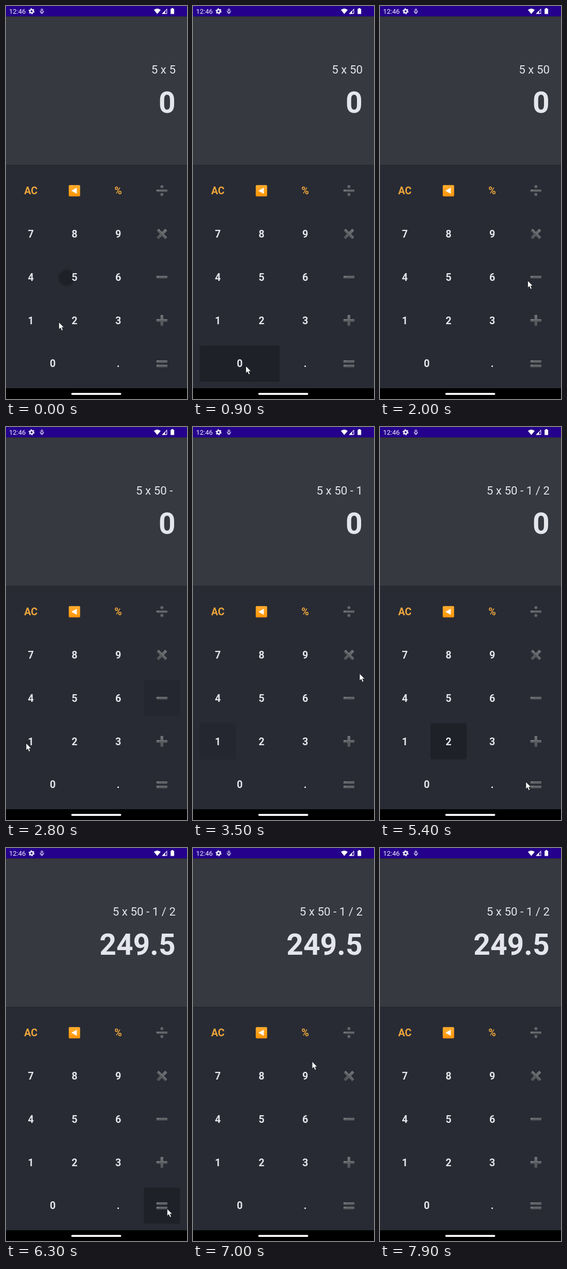
An HTML page that plays this animation: 351 px wide and 762 px high, repeating every 8 s.

```html
<!DOCTYPE html>
<html lang="en">
<head>
<meta charset="utf-8">
<title>Calculator</title>
<style>
  html, body { margin: 0; width: 100%; height: 100%; overflow: hidden; background: #000; }
  svg { display: block; width: 100%; height: 100%; }
  text { font-family: Roboto, Arial, sans-serif; fill: #e4e6eb; }
  .key { font-size: 19.7px; font-weight: 700; text-anchor: middle; }
  .accent { fill: #efa63c; }
  #expr { font-size: 22.3px; text-anchor: end; }
  #result { font-size: 57px; font-weight: 700; text-anchor: end; }
  #clock { font-size: 13px; fill: #f4f0ff; }
</style>
</head>
<body>
<svg viewBox="0 0 351 762">
  <defs>
    <linearGradient id="metal" x1="0" y1="0" x2="0" y2="1">
      <stop offset="0" stop-color="#74767a"/>
      <stop offset=".4" stop-color="#626468"/>
      <stop offset="1" stop-color="#505256"/>
    </linearGradient>
    <linearGradient id="amber" x1="0" y1="0" x2="0" y2="1">
      <stop offset="0" stop-color="#ffac30"/>
      <stop offset=".85" stop-color="#ff9a0c"/>
      <stop offset="1" stop-color="#e98a14"/>
    </linearGradient>
    <filter id="soft" x="-30%" y="-30%" width="160%" height="160%"><feGaussianBlur stdDeviation="1.8"/></filter>
  </defs>

  <rect width="351" height="20.2" fill="#25008c"/>
  <rect y="20.2" width="351" height="288.3" fill="#36393f"/>
  <rect y="308.5" width="351" height="433" fill="#282b34"/>
  <rect y="741.3" width="351" height="21" fill="#000"/>
  <rect x="126.5" y="750.3" width="97" height="3.6" rx="1.8" fill="#fff"/>

  <!-- status bar -->
  <text id="clock" x="6" y="14.6">12:46</text>
  <g fill="none" stroke="#f4f0ff">
    <circle cx="49.6" cy="10.2" r="3.2" stroke-width="2.5"/>
    <circle cx="49.6" cy="10.2" r="5" stroke-width="1.6" stroke-dasharray="2.6 2.636"/>
    <circle cx="69.6" cy="7.4" r="1.7" stroke-width="1.1"/>
    <path d="M66.2 9.2a3.4 3 0 0 0 6.8 0M67.2 12.6l2.4 2.2l2.4-2.2" stroke-width="1.1"/>
    <path d="M304 14.6H311.8V6.2Z" stroke-width="1.2"/>
  </g>
  <g fill="#fff">
    <path d="M286.8 7.4Q293.4 2.4 300 7.4L293.4 15.4Z"/>
    <path d="M302.2 15.2L308.6 8.8V15.2Z"/>
    <path d="M319.2 5.4H321.1V4.1H324.2V5.4H326.1V15.6H319.2Z"/>
  </g>

  <text id="expr" x="329" y="131"></text>
  <text id="result" x="328.6" y="206.7"></text>
  <g id="presses" fill="#000"></g>
  <g id="keys"></g>
  <path id="cursor" d="M0 0V14L3.2 11.1L5.4 16.4L8 15.3L5.8 10.2H10Z" fill="#fff" stroke="#15171c" stroke-width=".8"/>
</svg>
<script>
const LOOP = 8000, STEP = 100;
const $ = id => document.getElementById(id);
const clamp = v => Math.max(0, Math.min(1, v));
const mix = (a, b, p) => a + (b - a) * p;
const smooth = p => p * p * (3 - 2 * p);

function add(parent, tag, attrs, text = '') {
  const el = document.createElementNS('http://www.w3.org/2000/svg', tag);
  for (const k in attrs) el.setAttribute(k, attrs[k]);
  el.textContent = text;
  parent.append(el);
  return el;
}

// Keypad: each row lists its keys; the wide 0 fills two cells
const cells = {};
const symbols = {
  '/': g => {
    bar(g, 0, 4.4);
    for (const cy of [-7.6, 7.6]) add(g, 'circle', { cy, r: 3 });
  },
  'x': g => cross(g, 23.6, 45),
  '-': g => bar(g, 0, 5),
  '+': g => cross(g, 21.4, 0),
  '=': g => { bar(g, -4, 5); bar(g, 4.5, 5); },
  '<': g => {
    add(g, 'rect', { x: -11.2, y: -11, width: 22, height: 22, rx: 2, fill: 'url(#amber)' });
    add(g, 'path', { d: 'M-5.4 0L4 -5.2V5.2Z', fill: '#fff', stroke: '#fff', 'stroke-width': .8, 'stroke-linejoin': 'round' });
  }
};

function bar(g, y, h, w = 21.4) {
  add(g, 'rect', { x: -w / 2, y: y - h / 2, width: w, height: h, rx: .8 });
  add(g, 'rect', { x: 1 - w / 2, y: y - h / 2 + .8, width: 4, height: 1.2, rx: .6, fill: '#8b8d91' });
}

function cross(g, w, turn) {
  const arms = add(g, 'g', { transform: `rotate(${turn})` });
  add(arms, 'rect', { x: -2.7, y: -w / 2, width: 5.4, height: w, rx: .8 });
  bar(arms, 0, 5.4, w);
}

['AC < % /', '7 8 9 x', '4 5 6 -', '1 2 3 +', '0 0 . ='].forEach((row, r) =>
  row.split(' ').forEach((key, c) => {
    const x = 48.2 + 84.7 * c, y = 358.2 + 83.8 * r;
    if (cells[key]) Object.assign(cells[key], { x: x - 42.35, half: 77.5 });
    else cells[key] = { x, y, half: 35 };
  }));

for (const key in cells) {
  const { x, y } = cells[key];
  if (symbols[key]) symbols[key](add($('keys'), 'g', { transform: `translate(${x} ${y})`, fill: 'url(#metal)' }));
  else add($('keys'), 'text', { class: /AC|%/.test(key) ? 'key accent' : 'key', x, y: y + 7 }, key);
}

// Cursor stops; those with a key also tap it
const stops = [
  { x: 102.5, y: 528, arrive: -400, leave: -300, key: '5' },
  { x: 102.5, y: 698, arrive: 300, leave: 900, key: '0' },
  { x: 286.5, y: 532.5, arrive: 1800, leave: 2200, key: '-' },
  { x: 39, y: 613, arrive: 2500, leave: 3000, key: '1' },
  { x: 323, y: 478, arrive: 3500, leave: 3500 },
  { x: 305, y: 366, arrive: 4100, leave: 4300, key: '/' },
  { x: 123, y: 626, arrive: 4600, leave: 5100, key: '2' },
  { x: 312.5, y: 699.5, arrive: 5500, leave: 6600, key: '=' },
  { x: 231, y: 414, arrive: 7000, leave: 7300 },
  { x: 354, y: 387, arrive: 7900, leave: LOOP }
];

// A tap goes down, enters its key, then the highlight lingers and fades
const DOWN = 250, ENTER = 150, EVALUATE = 400, LINGER = 400, FADE = 300;
const taps = stops.filter(s => s.key).map((s, i) => {
  const cell = cells[s.key], { half } = cell;
  const clip = add($('presses'), 'clipPath', { id: 'cell' + i });
  add(clip, 'rect', { x: cell.x - half, y: cell.y - 35, width: half * 2, height: 70, rx: 3 });
  const g = add($('presses'), 'g', { 'clip-path': `url(#cell${i})` });
  const down = s.arrive + DOWN;
  const enter = down + ENTER + (s.key === '=' ? EVALUATE : 0);
  return { ...s, cell, down, enter, reach: Math.hypot(half, 35) + 5, dot: add(g, 'circle', { filter: 'url(#soft)' }) };
});

function drawText(t) {
  const typed = taps.filter(k => k.enter <= t).map(k => k.key);
  const done = typed.includes('=');
  const expr = '5 x ' + typed.join('').replace('=', '').replace(/[-/]/g, ' $& ');
  $('expr').textContent = expr.replace(/ /g, '\u00a0');
  $('result').textContent = done ? 5 * 50 - 1 / 2 : 0;
}

function drawCursor(t) {
  const i = stops.findIndex(s => s.arrive > t);
  const b = stops.at(i), a = i < 0 ? b : stops[i - 1];
  const p = i < 0 ? 1 : smooth(clamp((t - a.leave) / (b.arrive - a.leave)));
  $('cursor').setAttribute('transform', `translate(${mix(a.x, b.x, p)} ${mix(a.y, b.y, p)})`);
}

function drawTap({ dot, cell, x, y, down, enter, reach }, t) {
  const grow = clamp((t - down) / 300);
  const fade = clamp((t - enter - LINGER) / FADE);
  dot.setAttribute('cx', mix(x, cell.x, grow));
  dot.setAttribute('cy', mix(y, cell.y, grow));
  dot.setAttribute('r', reach * grow ** 1.8);
  dot.setAttribute('opacity', .23 * (1 - fade));
}

function tick() {
  const t = Math.floor(performance.now() % LOOP / STEP) * STEP;
  drawText(t);
  drawCursor(t);
  for (const tap of taps) drawTap(tap, t);
  requestAnimationFrame(tick);
}
tick();
</script>
</body>
</html>
```
